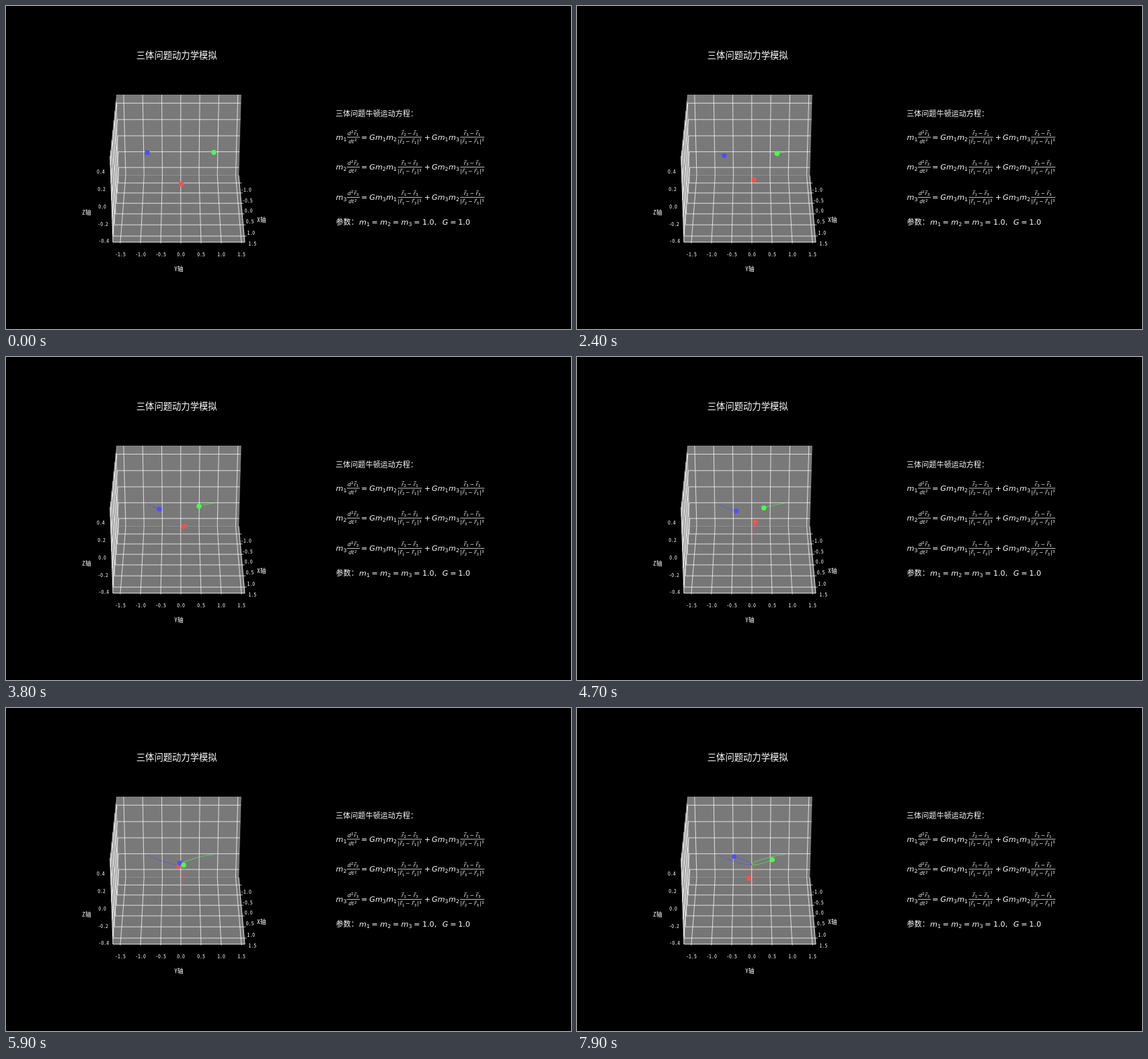
Write an HTML page with a canvas that moves like this. It is 840 px wide and 480 px high and loops after 8000 ms.

```html
<!DOCTYPE html>
<html lang="zh">
<head>
<meta charset="utf-8">
<style>
html, body { margin: 0; width: 100%; height: 100%; overflow: hidden; background: #000; }
canvas { display: block; }
</style>
</head>
<body>
<canvas id="stage" width="840" height="480"></canvas>
<script>
const ctx = document.getElementById('stage').getContext('2d');
const STEP = 100, FRAMES = 80;
const CJK = '"Noto Sans CJK SC", "Noto Sans CJK", sans-serif';
const MONO = '"Noto Sans Mono CJK SC", "Noto Sans Mono", monospace';
const MATH = '"DejaVu Sans", sans-serif';
const X0 = -1.398, X1 = 1.762, Y0 = -1.683, Y1 = 1.583, Z0 = -0.5, Z1 = 0.5;

// Perspective view of the plot box
function project(x, y, z) {
  const u = (x - X0) / (X1 - X0), v = (z - Z0) / (Z1 - Z0);
  const w = 1 - 0.092 * u - 0.038 * v;
  return [257 + 54.5 * (y + 0.05) / w, (251.5 + 67.2 * u - 124.5 * v) / w];
}

function path(points) {
  ctx.beginPath();
  points.forEach(p => ctx.lineTo(...p));
}

function line(color, width, points) {
  path(points);
  ctx.strokeStyle = color;
  ctx.lineWidth = width;
  ctx.stroke();
}

function text(s, x, y, size, family, align = 'left', style = '') {
  ctx.font = `${style} ${size}px ${family}`;
  ctx.textAlign = align;
  ctx.fillStyle = '#fff';
  ctx.fillText(s, x, y);
}

const label = (s, x, y, size, family) => text(s, x, y + 0.37 * size, size, family, 'center');
const range = (from, count, step) => Array.from({ length: count }, (_, i) => from + i * step);

function drawBox() {
  const panes = [
    ['#737373', [[X0, Y0, Z0], [X0, Y0, Z1], [X1, Y0, Z1], [X1, Y0, Z0]]],
    ['#797979', [[X0, Y0, Z0], [X0, Y1, Z0], [X0, Y1, Z1], [X0, Y0, Z1]]],
    ['#767676', [[X0, Y0, Z0], [X0, Y1, Z0], [X1, Y1, Z0], [X1, Y0, Z0]]]
  ];
  for (const [fill, corners] of panes) {
    path(corners.map(c => project(...c)));
    ctx.closePath();
    ctx.fillStyle = fill;
    ctx.fill();
    ctx.strokeStyle = 'rgba(255,255,255,.25)';
    ctx.lineWidth = 0.9;
    ctx.stroke();
  }
  const grid = (...pts) => line('rgba(255,255,255,.85)', 0.9, pts.map(p => project(...p)));

  range(-1, 6, 0.5).forEach((x, i) => {
    grid([x, Y0, Z1], [x, Y0, Z0], [x, Y1 + 0.06, Z0]);
    label(x.toFixed(1), 357 + 1.85 * i, 273.3 + 15.3 * i + 0.14 * i * i, 7.8, MONO);
  });
  range(-1.5, 7, 0.5).forEach((y, i) => {
    grid([X0, y, Z1], [X0, y, Z0], [X1 + 0.05, y, Z0]);
    label(y.toFixed(1), 170 + 30 * i, 369.5, 7.8, MONO);
  });
  range(-2, 5, 1).forEach((k, i) => {
    const z = k / 5;
    grid([X1, Y0, z], [X0, Y0, z], [X0, Y1, z]);
    label(z.toFixed(1), 145.3 - 1.1 * i, 349.5 - 25.8 * i, 7.8, MONO);
  });
  grid([X1, Y0, Z1], [X1, Y0, Z0], [X1, Y1, Z0], [X0, Y1, Z0]);

  label('X轴', 380, 318.2, 8.9, MONO);
  label('Y轴', 257, 391, 8.9, MONO);
  label('Z轴', 120, 307, 8.9, MONO);
  label('三体问题动力学模拟', 253.7, 73.5, 13.33, CJK);
}

const italic = (s, x, y, size = 11.1) => text(s, x, y, size, MATH, 'left', 'italic');
const roman = (s, x, y, size = 11.1) => text(s, x, y, size, MATH);

function mass(n, x, y) {
  italic('m', x, y);
  roman(n, x + 10.9, y + 1.8, 7.8);
}

function vector(n, x, y) {
  italic('r', x, y, 7.8);
  roman(n, x + 3.4, y + 1.3, 5.5);
  line('#fff', 0.6, [[x + 0.6, y - 6], [x + 4, y - 6], [x + 2.8, y - 7]]);
}

function difference(p, q, x, y) {
  vector(p, x, y);
  roman('−', x + 8.6, y, 7.8);
  vector(q, x + 17.8, y);
}

const bar = (x, y, w) => line('#fff', 0.8, [[x, y], [x + w, y]]);

function force(a, b, x, y) {
  italic('G', x, y + 4);
  mass(a, x + 8.7, y + 4);
  mass(b, x + 25, y + 4);
  const f = x + 42.3;
  bar(f, y, 36);
  difference(b, a, f + 5.5, y - 3.5);
  roman('|', f, y + 9, 7.8);
  difference(b, a, f + 3, y + 9);
  roman('|', f + 28.6, y + 9, 7.8);
  roman('3', f + 31.6, y + 6.3, 5.5);
}

function equation(a, b, c, y) {
  mass(a, 490.5, y + 4);
  bar(507, y, 19);
  italic('d', 507.8, y - 3.5, 7.8);
  roman('2', 513, y - 6.3, 5.5);
  vector(a, 517.3, y - 3.5);
  italic('dt', 509.2, y + 9, 7.8);
  roman('2', 518, y + 6.3, 5.5);
  roman('=', 528, y + 4);
  force(a, b, 540.2, y);
  roman('+', 621.7, y + 4);
  force(a, c, 633, y);
}

function drawFormulas() {
  text('三体问题牛顿运动方程：', 490, 164, 11.1, CJK);
  equation(1, 2, 3, 195);
  equation(2, 1, 3, 239.4);
  equation(3, 1, 2, 284.4);
  text('参数：', 490.5, 325, 11.1, CJK);
  for (let i = 0; i < 3; i++) {
    mass(i + 1, 525 + 31.3 * i, 325);
    roman('=', 543.6 + 31.3 * i, 325);
  }
  roman('1.0,', 619, 325);
  italic('G', 648.8, 325);
  roman('=', 660.2, 325);
  roman('1.0', 672.3, 325);
}

// Each body follows a slowly turning ellipse
function orbit(frame) {
  const a = 0.57, e = 0.979, b = a * Math.sqrt(1 - e * e);
  const mean = Math.PI + 0.033 * (frame - 58.1);
  let lo = 0, hi = 2 * Math.PI;
  for (let i = 0; i < 40; i++) {
    const mid = (lo + hi) / 2;
    if (mid + e * Math.sin(mid) < mean) lo = mid; else hi = mid;
  }
  let angle = Math.atan2(b * Math.sin(lo), a * (e + Math.cos(lo)));
  if (angle < 0) angle += 2 * Math.PI;
  return {
    r: a * (1 + e * Math.cos(lo)),
    angle: angle * 1.0188 - 0.06,
    strain: 0.015 + 0.01 * angle // the triangle stretches along x as it turns
  };
}

const orbits = range(0, FRAMES, 1).map(orbit);
const bodies = ['255,80,80', '80,255,80', '80,80,255'].map((rgb, i) => ({
  rgb,
  points: orbits.map(({ r, angle, strain }) => {
    const t = angle + i * 2 * Math.PI / 3;
    return project(r * (1 + strain) * Math.cos(t), r * (1 - strain) * Math.sin(t), 0);
  })
}));

function draw(now) {
  const frame = Math.floor(now / STEP) % FRAMES;
  ctx.fillStyle = '#000';
  ctx.fillRect(0, 0, 840, 480);
  drawBox();
  drawFormulas();
  for (const { rgb, points } of bodies) {
    line(`rgba(${rgb},.7)`, 1, points.slice(0, frame + 1));
  }
  for (const i of [0, 2, 1]) {
    const { rgb, points } = bodies[i];
    ctx.beginPath();
    ctx.arc(...points[frame], 3.7, 0, 2 * Math.PI);
    ctx.fillStyle = `rgb(${rgb})`;
    ctx.fill();
  }
}

const start = performance.now();
function tick() {
  draw(performance.now() - start);
  requestAnimationFrame(tick);
}
tick();
</script>
</body>
</html>
```
